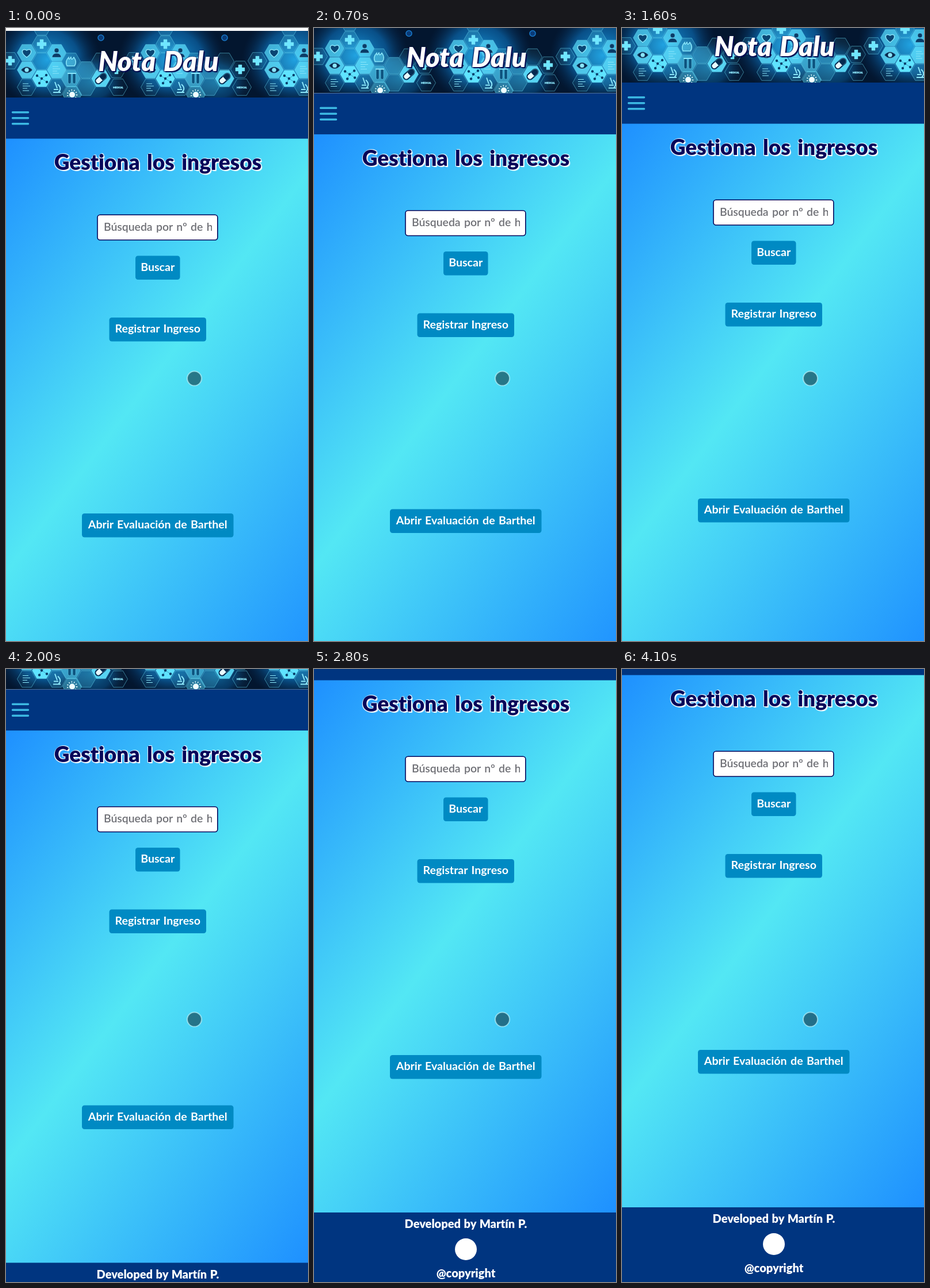
Animation, 525 px wide and 1067 px high, one loop 4200 ms. Source, as an HTML page:

```html
<!DOCTYPE html>
<html lang="es">
<head>
<meta charset="utf-8">
<title>Gestiona los ingresos</title>
<style>
html, body { margin: 0; width: 100%; height: 100%; overflow: hidden; background: #fff; }
svg { display: block; width: 525px; height: 1067px; }
text { font: 700 19.6px Lato, sans-serif; word-spacing: 1.6px; font-variant-ligatures: none; }
.mid { text-anchor: middle; }
.brand { font-size: 47px; font-weight: 900; font-style: italic; word-spacing: 4px; fill: #fff;
  text-shadow: 2px 2px 1px #00094f, -1px 1px 2px #00094f, 0 0 2px #00094f; }
.title { font-size: 37px; font-weight: 900; word-spacing: 4px; fill: #06065a;
  text-shadow: 2px 2px 1px #fff, -1px 1px 1px #fff, 1px -1px 1px #fff; }
.foot { font-size: 20px; font-weight: 900; word-spacing: 1px; fill: #fff; }
.button rect { fill: #008ac3; }
.button text { fill: #fff; }
.hint { font-size: 19.4px; font-weight: 600; fill: #6f7076; }
.tiny { font-size: 4px; fill: #8fd8ee; text-anchor: middle; }
</style>
</head>
<body>
<svg viewBox="0 0 525 1067">
  <defs>
    <linearGradient id="sky" gradientUnits="userSpaceOnUse" x1="-128" y1="362" x2="653" y2="950">
      <stop offset="0" stop-color="#1e90ff"/>
      <stop offset=".465" stop-color="#53e7f4"/>
      <stop offset="1" stop-color="#1e90ff"/>
    </linearGradient>
    <radialGradient id="glow">
      <stop offset="0" stop-color="#1aa0e6" stop-opacity=".95"/>
      <stop offset=".6" stop-color="#0b68ae" stop-opacity=".7"/>
      <stop offset="1" stop-color="#06315f" stop-opacity="0"/>
    </radialGradient>
    <clipPath id="banner"><rect y="5" width="525" height="116"/></clipPath>
    <clipPath id="field"><rect x="170" y="327" width="188" height="40"/></clipPath>
    <g id="tile"></g>
  </defs>

  <g id="page">
    <g clip-path="url(#banner)">
      <rect y="5" width="525" height="116" fill="#03162f"/>
      <g id="tiles"></g>
    </g>
    <text class="brand mid" x="265" y="75">Nota Dalu</text>

    <rect y="121" width="525" height="73" fill="#003580"/>
    <path d="M11.5 146.7H38.5M11.5 156.7H38.5M11.5 166.7H38.5" stroke="#3cb9e3" stroke-width="3.4" stroke-linecap="round"/>

    <rect y="192.6" width="525" height="927" fill="url(#sky)"/>
    <text class="title mid" x="264" y="247">Gestiona los ingresos</text>
    <rect x="159" y="325.2" width="208.8" height="43.8" rx="4.5" fill="#fff" stroke="#06065a" stroke-width="1.6"/>
    <g clip-path="url(#field)"><text class="hint" x="170" y="352.5">Búsqueda por nº de historia</text></g>
    <g id="buttons"></g>

    <rect y="1119" width="525" height="140" fill="#003580"/>
    <text class="foot mid" x="264" y="1146">Developed by Martín P.</text>
    <circle cx="264" cy="1183" r="19" fill="#fff"/>
    <text class="foot mid" x="264" y="1232">@copyright</text>
  </g>

  <circle cx="327.5" cy="610" r="12.5" fill="rgba(10,40,50,.56)" stroke="rgba(190,245,250,.65)" stroke-width="2"/>
</svg>

<script>
const byId = id => document.getElementById(id);

// Banner artwork: icons are centred on 0,0 and set in a honeycomb
const icons = {
  heart: '<path d="M0 8C-13-1-7-9 0-4C7-9 13-1 0 8Z" fill="#0a4674" stroke-width="1.5"/>',
  cross: '<path d="M-3-8H3V-3H8V3H3V8H-3V3H-8V-3H-3Z" fill="#6fe6ff"/>',
  user: '<circle cy="-4" r="4" fill="#0a3c68"/><path d="M-8 8Q-7 1 0 1T8 8Z" fill="#0a3c68"/>',
  eye: '<path d="M-10 0Q0-11 10 0Q0 11-10 0Z" fill="#062a50"/><circle r="3.5" fill="#8be6fa"/>',
  molecule: '<path d="M-8-5L0 0L8-6M0 0L-4 8M0 0L9 6" stroke="#07406c" fill="none"/>' +
    [[-8, -5], [0, 0], [8, -6], [-4, 8], [9, 6]].map(([x, y]) => `<circle cx="${x}" cy="${y}" r="2.2" fill="#07406c" stroke="none"/>`).join(''),
  flame: '<path d="M-7 8Q-11 0-4-7Q-4 0 0-8Q0 0 5-7Q11 1 6 8Z" fill="#5fd8f6" fill-opacity=".5" stroke-width="1.5"/>',
  pill: '<g transform="rotate(-42)"><rect x="-11" y="-5" width="22" height="10" rx="5" fill="#e8fbff" stroke="#052a50" stroke-width="2"/><path d="M0-5H6A5 5 0 0 1 6 5H0Z" fill="#052a50"/></g>',
  tube: '<path d="M-5-9V7Q-2 11 0 7V-9ZM3-9V7Q6 11 8 7V-9Z" fill="#0b527e"/><path d="M-6-9H9" stroke-width="2"/>',
  scope: '<path d="M-3-9L1 2M-6 9H7M-5 4H3M2-5Q10 2 3 9" fill="none" stroke-width="2"/>',
  lines: '<path d="M-7-6H3M-7-2H6M-7 2H1M-7 6H4" stroke-width="1"/>',
  sun: '<circle r="5" fill="#f0fdff"/><circle r="8" fill="none" stroke="#dffaff" stroke-width="2.5" stroke-dasharray="1.5 3"/>',
  label: '<text class="tiny" y="1.5">MEDICAL</text>',
  none: ''
};
const cells = [
  [62, -7, 'none', .15], [36, 38, 'heart', .65], [62, 23, 'cross', .2], [88, 38, 'user', .7],
  [62, 53, 'none', .12], [7, 52, 'cross', .1], [36, 68, 'eye', .8], [88, 68, 'lines', .8],
  [62, 83, 'molecule', 1], [113, 53, 'flame', .2], [113, 83, 'tube', .55], [139, 68, 'none', .35],
  [165, 83, 'pill', .9], [192, 67, 'cross', .05], [36, 98, 'lines', .05], [88, 98, 'scope', .15],
  [115, 111, 'sun', .4], [195, 98, 'label', .03], [139, 98, 'none', .2], [165, 53, 'none', .08]
];
const hexagon = 'M-16.5 0L-8.2-14.3H8.2L16.5 0L8.2 14.3H-8.2Z';

byId('tile').innerHTML =
  '<ellipse cx="72" cy="50" rx="92" ry="84" fill="url(#glow)"/>' +
  '<ellipse cx="152" cy="88" rx="55" ry="48" fill="url(#glow)" opacity=".6"/>' +
  '<circle cx="165" cy="12" r="5" fill="#0a3b78" stroke="#1878c8" stroke-width="1.6"/>' +
  cells.map(([x, y, icon, glow]) =>
    `<g transform="translate(${x} ${y})" stroke="#69d8f2" stroke-width=".8">
      <path d="${hexagon}" fill="#5fe3ff" fill-opacity="${glow}" stroke-opacity=".65"/>
      <g stroke="#8be6fa" stroke-width=".4">${icons[icon]}</g></g>`).join('');
byId('tiles').innerHTML = [-215, 0, 215, 430].map(x => `<use href="#tile" x="${x}" y="5"/>`).join('');

const buttons = [
  ['Buscar', 225, 396.5, 77.5],
  ['Registrar Ingreso', 179.5, 504, 168.5],
  ['Abrir Evaluación de Barthel', 132, 845, 263.5]
];
byId('buttons').innerHTML = buttons.map(([label, x, y, w]) =>
  `<g class="button"><rect x="${x}" y="${y}" width="${w}" height="41.5" rx="4.5"/>
   <text class="mid" x="${x + w / 2}" y="${y + 26}">${label}</text></g>`).join('');

// [time in ms, scroll offset in px]
const scroll = [[0, 0], [700, 7.5], [1300, 18], [1600, 26], [1800, 50], [2000, 85.5], [2200, 115],
  [2400, 139], [2600, 158], [2800, 173], [3000, 181], [3300, 182.5], [4100, 182], [4200, 182]];

function scrollAt(t) {
  const i = scroll.findIndex(([end]) => end > t);
  const [t0, y0] = scroll[i - 1], [t1, y1] = scroll[i];
  return y0 + (y1 - y0) * (t - t0) / (t1 - t0);
}

const page = byId('page');
const start = performance.now();
function draw() {
  const t = (performance.now() - start) % 4200;
  const step = Math.floor(t / 100) * 100;
  page.setAttribute('transform', `translate(0 ${-scrollAt(step)})`);
  requestAnimationFrame(draw);
}
draw();
</script>
</body>
</html>
```
